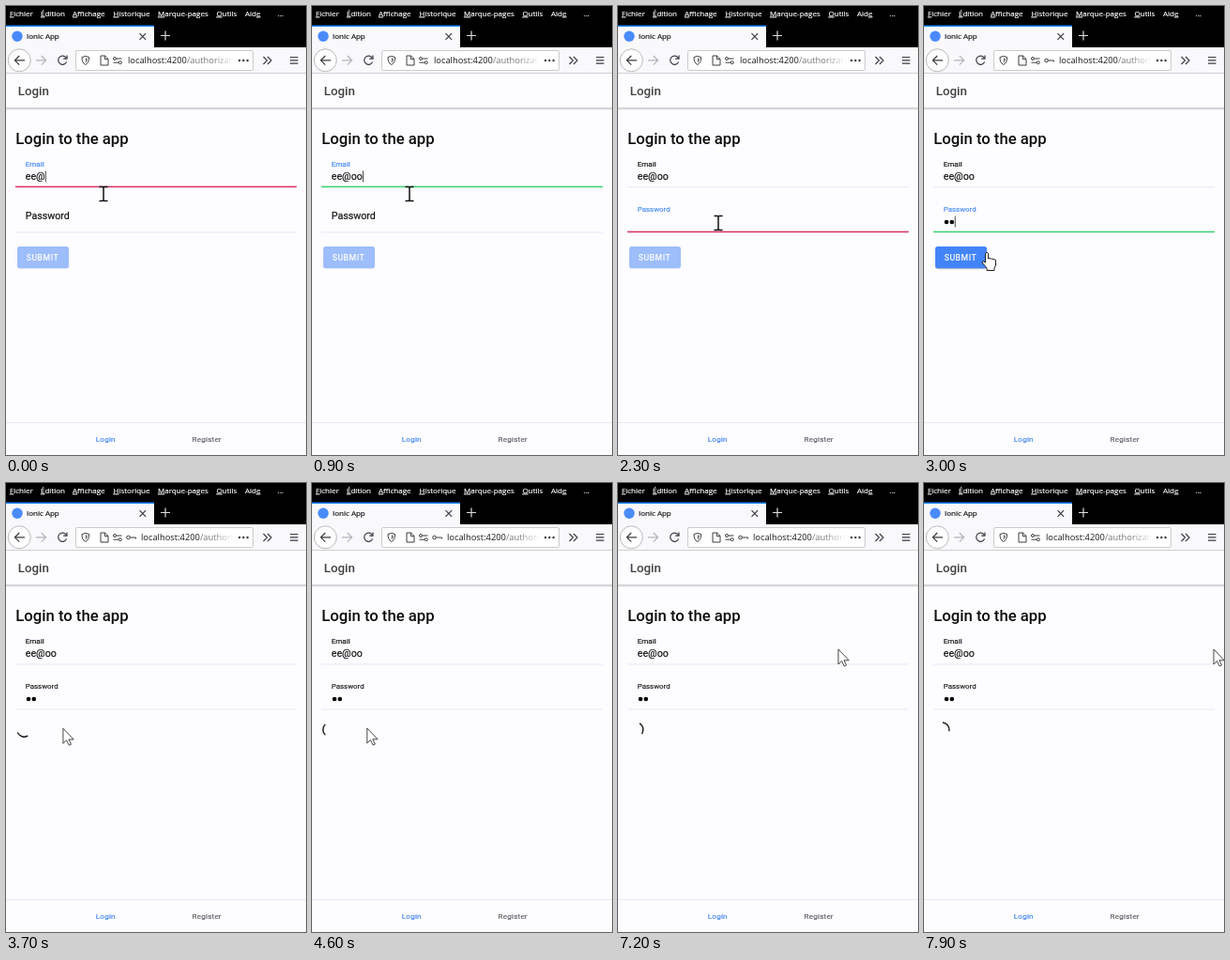
Animation, 320 px wide and 478 px high, one loop 8000 ms. Source, as an HTML page:

```html
<!DOCTYPE html>
<html lang="fr">
<head>
<meta charset="utf-8">
<title>Login</title>
<style>
  html, body { margin: 0; width: 100%; height: 100%; overflow: hidden; background: #fdfcfe; }
  svg { display: block; width: 100vw; height: 100vh; }
  text { white-space: pre; }
  .ui { font-family: "Open Sans", "Noto Sans", sans-serif; font-size: 8px; }
  .app { font-family: Roboto, Inter, sans-serif; font-size: 10.67px; }
  .small { font-size: 8px; }
  .bold { font-weight: 500; }
  .dense { stroke: currentColor; stroke-width: .18; }
  .icon { fill: none; stroke: #3c3c40; stroke-width: 1.2; }
  .thin { stroke-width: 1; }
</style>
</head>
<body>
<svg viewBox="0 0 320 478">
  <defs>
    <linearGradient id="fade" gradientUnits="userSpaceOnUse" x1="221" x2="243">
      <stop stop-color="#fff" stop-opacity="0"/><stop offset="1" stop-color="#fff"/>
    </linearGradient>
    <linearGradient id="shade" x2="0" y2="1">
      <stop stop-color="#000" stop-opacity=".26"/><stop offset="1" stop-color="#000" stop-opacity="0"/>
    </linearGradient>
    <clipPath id="urlClip"><rect x="125" y="48" width="118" height="20"/></clipPath>
  </defs>
  <rect width="320" height="478" fill="#fdfcfe"/>

  <!-- browser -->
  <rect width="320" height="44" fill="#000"/>
  <g id="menu" class="ui dense" fill="#fff" color="#fff"></g>
  <rect y="21" width="158" height="23" fill="#f9f8fb"/>
  <rect y="20.5" width="158" height="1.5" fill="#0a84ff"/>
  <circle cx="12" cy="32.3" r="5.7" fill="#4a8bfc"/>
  <text class="ui dense" x="22" y="35.3" fill="#111" color="#111">Ionic App</text>
  <path class="icon" d="M142.5 29.2l6.6 6.6m0-6.6l-6.6 6.6"/>
  <path class="icon" d="M165 31.5h10m-5-5v10" style="stroke:#ddd"/>
  <rect y="44" width="320" height="28" fill="#f9f8fb"/>
  <circle cx="14.3" cy="57.8" r="12" fill="#fff" stroke="#b9b9bd"/>
  <path class="icon" d="M20 57.8H9.5m4.7-4.8l-4.8 4.8 4.8 4.8"/>
  <path class="icon" d="M32 57.8h10.5m-4.7-4.8l4.8 4.8-4.8 4.8" style="stroke:#b4b4b8"/>
  <path class="icon" d="M64.2 55.2a4.6 4.6 0 1 0 .4 4.2M65 52.4v3.8h-3.8"/>
  <rect x="74.5" y="47.5" width="189" height="21" rx="1.5" fill="#fff" stroke="#cbcbce"/>
  <path class="icon thin" d="M84.8 53.4l3.8 1.1c0 4-1 6.500-3.8 8c-2.800-1.500-3.800-4-3.800-8z"/>
  <path d="M84.8 55.3v5.200c1.300-1 1.900-2.500 2-4.600z" fill="#6c6c70"/>
  <path class="icon thin" d="M101 53h4.5l3.5 3.4v6.6h-8zM105.3 53v3.6h3.7"/>
  <path class="icon thin" d="M118 56h5.5M114.500 60.2h5.5"/>
  <circle class="icon thin" cx="116" cy="56" r="1.5"/>
  <circle class="icon thin" cx="121.8" cy="60.2" r="1.5"/>
  <g id="key" class="icon thin"><circle cx="130.5" cy="58" r="1.8"/><path d="M132.3 58h6.2v1.500"/></g>
  <g clip-path="url(#urlClip)">
    <text id="url" class="ui" y="61.2" style="font-size:9.33px" fill="#18181c">localhost:4200<tspan fill="#77777c">/authorization</tspan></text>
  </g>
  <rect x="221" y="50" width="22.5" height="16" fill="url(#fade)"/>
  <g fill="#3c3c40"><circle cx="249" cy="58" r="1.2"/><circle cx="253.3" cy="58" r="1.2"/><circle cx="257.6" cy="58" r="1.2"/></g>
  <path class="icon" d="M274.5 54l4 4-4 4m4.5-8l4 4-4 4M303 54.5h8.5m-8.5 3.3h8.5m-8.5 3.3h8.5"/>
  <path d="M0 71.5h320" stroke="#d0d0d3"/>

  <!-- page -->
  <text class="app bold" x="12.7" y="95" style="font-size:13.33px" fill="#424242">Login</text>
  <rect y="108.3" width="320" height="2.7" fill="url(#shade)"/>
  <text class="app bold" x="10.2" y="147" style="font-size:16.7px" fill="#0c0c0c">Login to the app</text>
  <text id="emailLabel" class="app small dense" x="20.8" y="171.3">Email</text>
  <text id="email" class="app dense" x="20.8" y="185.3" fill="#111" color="#111"></text>
  <rect id="emailLine" x="10" width="300"/>
  <text id="passLabel" class="app dense">Password</text>
  <circle class="dot" cx="24" cy="230" r="2.3"/>
  <circle class="dot" cx="29.8" cy="230" r="2.3"/>
  <rect id="passLine" x="10" width="300"/>
  <rect id="caret" width=".8" height="12" fill="#222"/>
  <g id="submit">
    <rect id="buttonShadow" x="12" y="257" width="55" height="23.3" rx="2.7" fill="#000"/>
    <rect id="button" x="12" y="256" width="55" height="23.3" rx="2.7"/>
    <text class="app bold" x="21.7" y="270.8" style="font-size:8.7px;letter-spacing:.5px" fill="#fff">SUBMIT</text>
  </g>
  <circle id="spinner" r="7.6" fill="none" stroke="#111" stroke-width="1.35" pathLength="360" stroke-dasharray="98 262"/>
  <path d="M0 443.5h320" stroke="#eae9ec"/>
  <g class="app small dense" style="letter-spacing:.24px">
    <text x="95.8" y="464" fill="#3f85f5" color="#3f85f5">Login</text>
    <text x="198.6" y="464" fill="#5f5f62" color="#5f5f62">Register</text>
  </g>

  <!-- pointers -->
  <path id="beam" fill="none" stroke="#111" stroke-width="1.5"
    d="M-4.5-7.5h3.5l1 1 1-1h3.5M0-6.5v13M-4.5 7.5h3.5l1-1 1 1h3.5"/>
  <path id="hand" fill="#fff" stroke="#222" stroke-linejoin="round"
    d="M-1.5 11V1.2q1.5-2.2 3 0V7q1.5-1.5 2.8.3 1.5-1 2.7.5 2-.8 2.5 1.2v5l-1.5 3v2.5H0V17l-5-6q0-2.5 3.5 0z"/>
  <path id="arrow" fill="#fff" stroke="#333" stroke-width=".9"
    d="M0 0V16L3.6 12.6 6.3 18 8.6 17 6 11.8H11.3Z"/>
</svg>
<script>
const LOOP = 8000, STEP = 100;
const FOCUS_PASSWORD = 1400, FIRST_KEY = 2800, SECOND_KEY = 2900, CLICK = 3300, KEY_HIDDEN = 7600;
const BLUE = '#3f86f7', RED = '#d8305f', GREEN = '#35d36e', GREY = '#e6e5e8', INK = '#111';
const $ = id => document.getElementById(id);
const set = (el, attrs) => Object.entries(attrs).forEach(([k, v]) => el.setAttribute(k, v));
const show = (el, on) => set(el, { visibility: on ? 'visible' : 'hidden' });
const dots = document.querySelectorAll('.dot');

// Each item: x, text before, underlined letter, text after.
const menu = [
  [4, '', 'F', 'ichier'], [37, '', 'É', 'dition'], [71, '', 'A', 'ffichage'],
  [114.5, '', 'H', 'istorique'], [162, '', 'M', 'arque-pages'],
  [224.5, '', 'O', 'utils'], [255, 'Aid', 'e', ''], [289.5, '...', '', '']
];
$('menu').innerHTML = menu.map(([x, before, key, after]) =>
  `<text x="${x}" y="10.5">${before}<tspan text-decoration="underline">${key}</tspan>${after}</text>`
).join('');

// Pointer path: time, x, y.
const path = [
  [0, 104, 200], [1000, 104, 200], [1300, 107, 231], [2300, 107, 231], [2800, 67, 262],
  [3500, 67, 262], [3800, 58.8, 261], [6500, 58.8, 261], [7100, 235, 177], [7400, 235, 177], [7800, 309, 177]
];
function pointerAt(t) {
  const i = path.findIndex(p => p[0] > t);
  if (i < 0) return path[path.length - 1].slice(1);
  const [t0, x0, y0] = path[i - 1], [t1, x1, y1] = path[i];
  const u = (t - t0) / (t1 - t0), e = u * u * (3 - 2 * u);
  return [x0 + (x1 - x0) * e, y0 + (y1 - y0) * e];
}

function underline(el, y, focused, valid) {
  set(el, focused
    ? { y: y - 1.3, height: 1.5, fill: valid ? GREEN : RED }
    : { y: y - .5, height: .9, fill: GREY });
}

function tint(el, focused) {
  const color = focused ? BLUE : INK;
  set(el, { fill: color, color });
}

function draw(t) {
  const onEmail = t < FOCUS_PASSWORD;
  const onPassword = !onEmail && t < CLICK;
  const filled = t >= FIRST_KEY;
  const typed = t < 300 ? 3 : t < 500 ? 4 : 5;

  $('email').textContent = 'ee@oo'.slice(0, typed);
  tint($('emailLabel'), onEmail);
  underline($('emailLine'), 193, onEmail, typed > 3);

  const lift = Math.min(1, Math.max(0, (t - FOCUS_PASSWORD) / 150));
  set($('passLabel'), {
    transform: `translate(20.8 ${227.3 - 8 * lift}) scale(${1 - .26 * lift})`
  });
  tint($('passLabel'), onPassword);
  underline($('passLine'), 241, onPassword, filled);
  show(dots[0], filled);
  show(dots[1], t >= SECOND_KEY);

  const lastKey = onEmail ? (t < 300 ? 0 : t < 500 ? 300 : 500)
    : t < FIRST_KEY ? FOCUS_PASSWORD : SECOND_KEY;
  const blinkOn = t < lastKey || Math.floor((t - lastKey) / 500) % 2 === 0;
  show($('caret'), t < CLICK && blinkOn);
  const passwordCaret = t < FIRST_KEY ? 20.8 : t < SECOND_KEY ? 27 : 32.8;
  set($('caret'), {
    x: onEmail ? 21 + $('email').getComputedTextLength() : passwordCaret,
    y: onEmail ? 175.5 : 223.5
  });

  show($('submit'), t < CLICK);
  set($('button'), { fill: filled ? '#4385f8' : '#9dbdfb' });
  set($('buttonShadow'), { opacity: filled ? .22 : .04 });
  show($('spinner'), t >= CLICK);
  const angle = (t - 4600) / 750 * 360 + 131;
  set($('spinner'), { transform: `translate(19.3 262.6) rotate(${angle})` });

  const keyShown = filled && t < KEY_HIDDEN;
  show($('key'), keyShown);
  set($('url'), { x: keyShown ? 144 : 130 });

  const [x, y] = pointerAt(t);
  const overButton = t < CLICK && x < 72 && y > 254;
  const kind = t >= CLICK ? 'arrow' : !overButton ? 'beam' : filled ? 'hand' : 'arrow';
  for (const id of ['beam', 'hand', 'arrow']) {
    show($(id), id === kind);
    set($(id), { transform: `translate(${x} ${y})` });
  }
}

const start = performance.now();
function tick(now) {
  const t = Math.max(0, now - start) % LOOP;
  draw(Math.floor(t / STEP) * STEP);
  requestAnimationFrame(tick);
}
draw(0);
requestAnimationFrame(tick);
</script>
</body>
</html>
```
